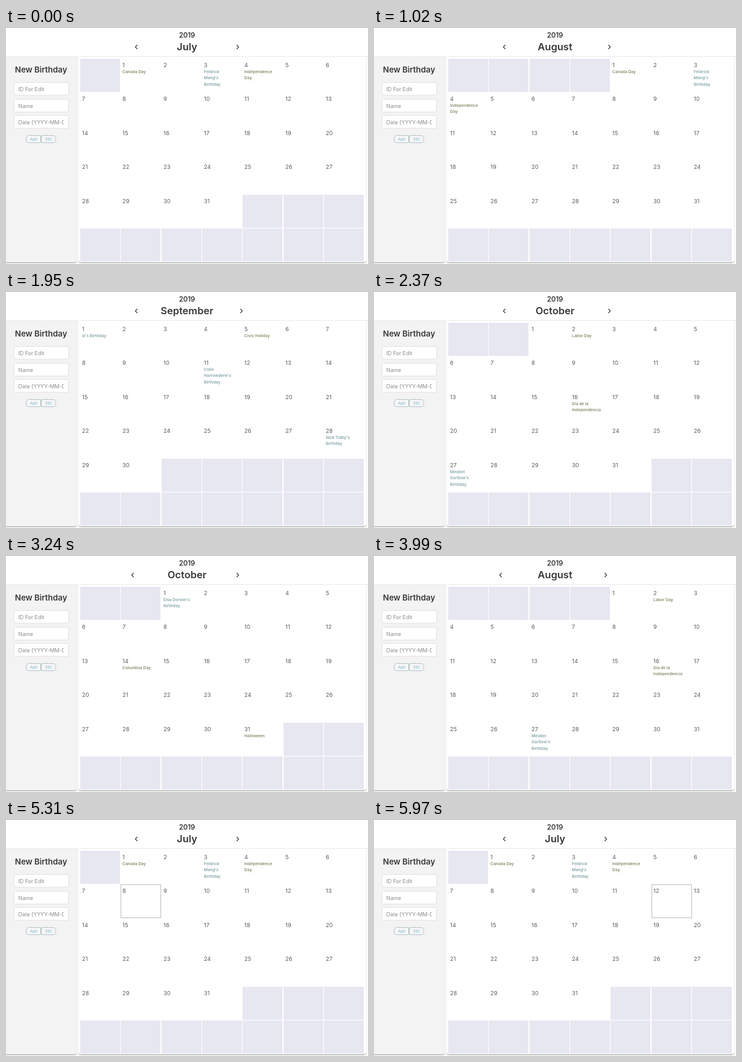
An HTML page that plays this animation: 600x392 px, repeating every 6 s.

```html
<!DOCTYPE html>
<html lang="en">
<head>
<meta charset="utf-8">
<title>Birthday calendar</title>
<style>
  html, body { margin: 0; width: 100%; height: 100%; overflow: hidden; background: #fff; }
  body { font-family: Inter, Roboto, sans-serif; color: #383838; }
  #stage { position: relative; width: 600px; height: 392px; overflow: hidden; background: #fff; }
  #stage * { box-sizing: border-box; }
  #stage div, #stage svg { position: absolute; white-space: nowrap; }

  .head { left: 0; top: 0; width: 600px; height: 48px; border-bottom: 1px solid #e9e9e9; text-align: center; }
  .year { left: 0; width: 600px; top: 5px; line-height: 15px; font-size: 11.4px; font-weight: 600; }
  .month { left: 0; width: 600px; top: 20px; line-height: 22px; font-size: 16.5px; font-weight: 600; }
  .arrow { top: 27px; width: 6px; height: 9px; fill: none; stroke: #444; stroke-width: 1.3; }
  #prev { left: 213px; }
  #next { left: 381px; }

  .side, .main { top: 48px; height: 341px; box-shadow: 0 1.5px 1px #b0b0b0, 0 0 2px #d4d4d4; clip-path: inset(0 -3px -3px -3px); }
  .side { left: 0; width: 117px; background: #f3f3f3; border-radius: 0 0 4px 0; }
  .main { left: 120px; width: 477px; background: #fff; border-radius: 0 0 4px 4px; }
  .side h2 { position: absolute; margin: 0; left: 0; width: 116px; top: 13px; line-height: 17px; text-align: center; font-size: 13.3px; font-weight: 600; }
  .field { left: 13px; width: 91px; height: 22px; padding: 0 7px 0 6.5px; background: #fff; border: 1px solid #e3e3e3; border-radius: 2px; }
  .field span { display: block; overflow: hidden; line-height: 21.5px; font-size: 8.8px; color: #8c8c8c; }
  .btn { top: 130px; width: 25px; height: 13px; border: 1px solid #b3c3cb; line-height: 12px; text-align: center; font-size: 5.7px; color: #82b5cc; background: #f5f6f6; }

  .cell { width: 67px; height: 56px; }
  .blank::before { content: ""; position: absolute; left: 0; top: 0; width: 66px; height: 55px; background: #e7e7f2; }
  .hover { border: 1px solid #bcbcbc; }
  .label { left: 0; top: 0; }
  .hover .label { left: -1px; top: -1px; }
  .day { left: 3.1px; top: 5px; line-height: 12px; font-size: 9.3px; color: #5c5c5c; }
  .event { left: 3.1px; top: 17px; line-height: 10.4px; font-size: 6.7px; font-weight: 600; color: #8c896c; }
  .birthday { color: #84a4a7; }
</style>
</head>
<body>
<div id="stage">
  <div class="head">
    <div class="year">2019</div>
    <div class="month" id="month"></div>
    <svg class="arrow" id="prev" viewBox="0 0 6 9"><path d="M4.6 1 1.4 4.5 4.6 8"/></svg>
    <svg class="arrow" id="next" viewBox="0 0 6 9"><path d="M1.4 1 4.6 4.5 1.4 8"/></svg>
  </div>
  <div class="side">
    <h2>New Birthday</h2>
    <div class="field" style="top:42px"><span>ID For Edit</span></div>
    <div class="field" style="top:70px"><span>Name</span></div>
    <div class="field" style="top:97px"><span>Date [YYYY-MM-DD]</span></div>
    <div class="btn" style="left:33px;border-radius:5px 2px 2px 5px">Add</div>
    <div class="btn" style="left:58px;border-radius:2px 5px 5px 2px">Edit</div>
  </div>
  <div class="main"></div>
  <div id="grid"></div>
</div>
<script>
  const LOOP = 6000, JUL = 6, AUG = 7, SEP = 8, OCT = 9;
  const NAMES = { [JUL]: 'July', [AUG]: 'August', [SEP]: 'September', [OCT]: 'October' };

  // Day of month -> label, "|" breaks a line.
  const EVENTS = {
    [JUL]: { 1: 'Canada Day', 3: "Feldrick|Mang's|Birthday", 4: 'Independence|Day' },
    [AUG]: { 1: "iii's Birthday", 5: 'Civic Holiday', 11: "Colin|Harrowdene's|Birthday", 28: "Nick Tolby's|Birthday" },
    [SEP]: { 2: 'Labor Day', 16: 'Día de la|Independencia', 27: "Mirabel|Gartlow's|Birthday" },
    [OCT]: { 1: "Elsa Dorwin's|Birthday", 14: 'Columbus Day', 31: 'Halloween' }
  };

  // Each track is a list of [start time, value]; events load after the month turns.
  const MONTH = [[0, JUL], [960, AUG], [1680, SEP], [2340, OCT], [3390, SEP], [3960, AUG], [4560, JUL]];
  const LOADED = [[0, JUL], [1260, AUG], [1980, SEP], [2640, OCT], [3630, SEP], [4200, AUG], [4830, JUL]];
  const HOVER = [[0, 0], [5070, 1], [5220, 8], [5430, 9], [5560, 10], [5700, 11], [5850, 12]];

  const $ = id => document.getElementById(id);
  const at = (track, t) => track.filter(([start]) => start <= t).pop()[1];

  function add(parent, className, text = '') {
    const el = document.createElement('div');
    el.className = className;
    el.innerText = text;
    parent.append(el);
    return el;
  }

  const cells = Array.from({ length: 42 }, (_, i) => {
    const box = add($('grid'), 'cell');
    box.style.left = Math.round(123 + (i % 7) * 67.3) + 'px';
    box.style.top = Math.round(50.6 + Math.floor(i / 7) * 56.5) + 'px';
    return box;
  });

  function render(month, loaded, hover) {
    const offset = new Date(2019, month, 1).getDay();
    const days = new Date(2019, month + 1, 0).getDate();
    $('month').textContent = NAMES[month];
    cells.forEach((box, i) => {
      const day = i - offset + 1;
      const blank = day < 1 || day > days;
      box.replaceChildren();
      box.className = 'cell' + (blank ? ' blank' : day === hover ? ' hover' : '');
      if (blank) return;
      const label = add(box, 'label');
      add(label, 'day', day);
      const event = EVENTS[loaded][day];
      if (event) add(label, event.endsWith('Birthday') ? 'event birthday' : 'event', event.replaceAll('|', '\n'));
    });
  }

  // 0..1 while the pointer rests on an arrow, eased at both ends.
  function rest(t, from, to) {
    const x = Math.max(0, Math.min(1, (t - from) / 150, (to - t) / 150));
    return x * x * (3 - 2 * x);
  }

  let shown = '';
  function draw(now) {
    const t = now % LOOP;
    const state = [MONTH, LOADED, HOVER].map(track => at(track, t));
    if (state.join() !== shown) {
      shown = state.join();
      render(...state);
    }
    $('prev').style.transform = `translateX(${-6 * rest(t, 2970, 5040)}px)`;
    $('next').style.transform = `translateX(${6 * rest(t, 420, 2850)}px)`;
  }

  const start = performance.now();
  function tick() {
    draw(performance.now() - start);
    requestAnimationFrame(tick);
  }
  tick();
</script>
</body>
</html>
```
